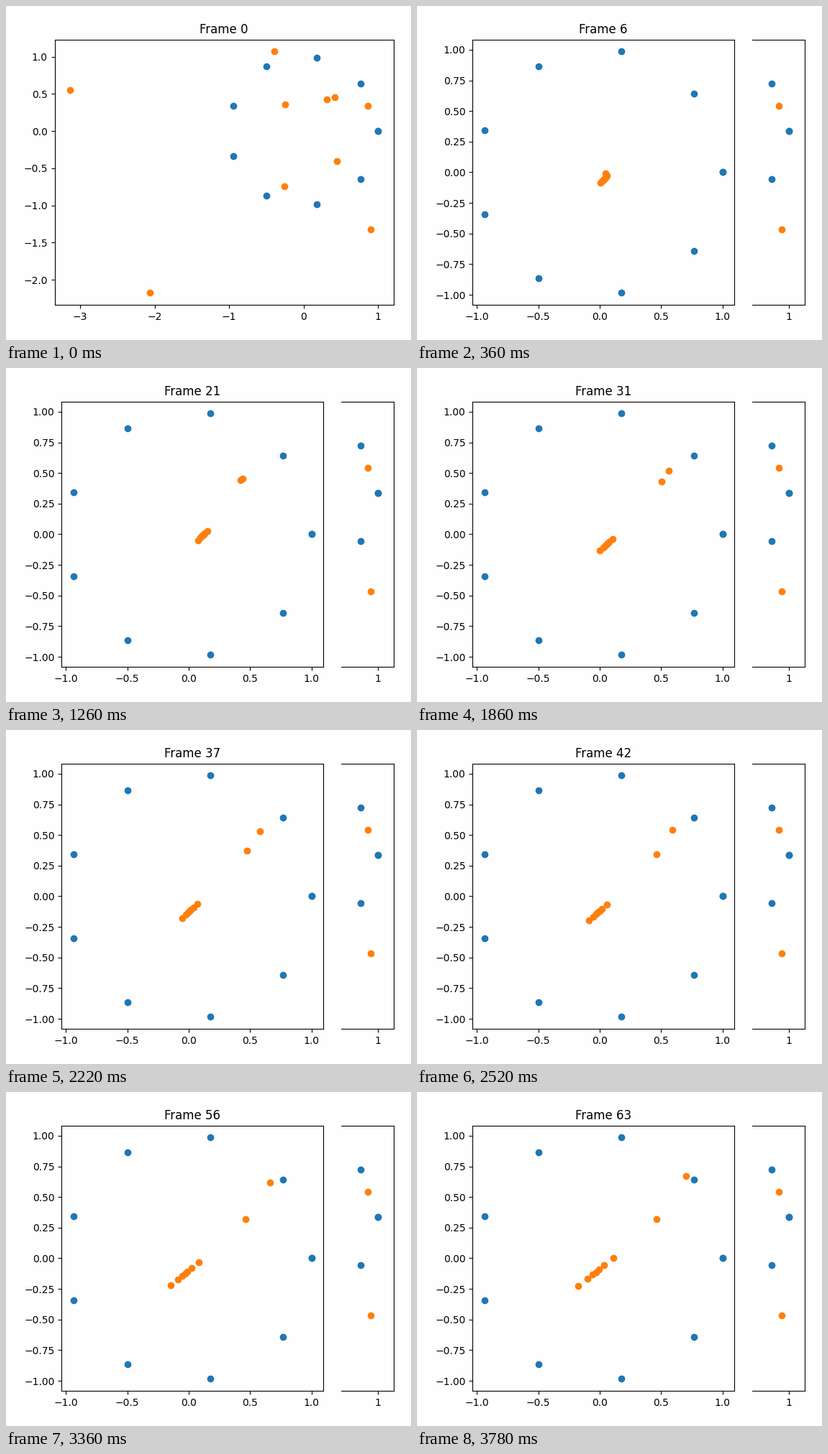
Write a matplotlib script that moves like this. It is 563 by 465 pixels and loops after 3840 ms.

```python
import numpy as np
import matplotlib.pyplot as plt
from matplotlib.animation import FuncAnimation
from matplotlib.patches import Rectangle

W, H, DPI = 563, 465, 100
FRAMES, INTERVAL = 64, 60
PAPER = "#fefefe"

# Plot boxes in pixels from the top left corner.
TOP, HEIGHT = 46.69, 369.6
WIDE_LEFT, WIDE_WIDTH = 67.6, 471
SQUARE_LEFT, SQUARE_WIDTH = 77.15, 364

angle = np.linspace(0, 2 * np.pi, 10)
circle = np.column_stack([np.cos(angle), np.sin(angle)])

noise = np.array([
    (-3.137, 0.552), (-0.39, 1.068), (0.31, 0.43), (0.42, 0.455),
    (-0.245, 0.358), (0.865, 0.34), (0.45, -0.405), (-0.255, -0.74),
    (0.903, -1.32), (-2.06, -2.178)])


def rise(t, centre, rate):
    return 1 / (1 + np.exp(-rate * (t - centre)))


def bump(t, centre, width):
    return np.exp(-((t - centre) / width) ** 2)


def leaders(t):
    """Two points that break away to the upper right and then part."""
    rise_x, rise_y = rise(t, 15.2, 0.2), rise(t, 12.9, 0.26)
    late = rise(t, 56, 0.17)
    return [
        (250 + 103.7 * rise_x + 26.5 * late, 252 - 110 * rise_y - 32 * late),
        (250 + 83 * rise_x + 15 * bump(t, 25, 9.5),
         252 - 75 * rise_y - 29 * bump(t, 22, 14)),
    ]


def group(t):
    """Seven points on a slanted line that drifts and stretches."""
    mid_x = 248.5 + 25 * bump(t, 20, 15)
    mid_y = 255.5 - 24 * bump(t, 17, 14.5) - 5 * bump(t, 66, 12)
    half = 3.3 * np.exp(0.0315 * t)
    slope = 1.1 - 0.0045 * t
    u = np.linspace(-1, 1, 7)
    spread = half * (u + u**3) / 2  # denser in the middle
    return np.column_stack([mid_x + spread, mid_y - slope * spread])


def predicted(t):
    """Point positions in data units of the square plot."""
    px = np.vstack([leaders(t), group(t)])
    low, high = circle.min(axis=0), circle.max(axis=0)
    centre = (SQUARE_LEFT + SQUARE_WIDTH / 2, TOP + HEIGHT / 2)
    scale = np.array([SQUARE_WIDTH, -HEIGHT]) / (1.1 * (high - low))
    return (low + high) / 2 + (px - centre) / scale


def make_axes(left, width, zorder):
    bottom = H - TOP - HEIGHT
    ax = fig.add_axes([left / W, bottom / H, width / W, HEIGHT / H],
                      zorder=zorder, facecolor=PAPER)
    ax.scatter(*circle.T)
    return ax


fig = plt.figure(figsize=(W / DPI, H / DPI), dpi=DPI, facecolor=PAPER)

wide = make_axes(WIDE_LEFT, WIDE_WIDTH, 0)
wide.scatter(*noise.T)
wide.set_title("Frame 0")

# The later, narrower plot leaves the right edge of the first one visible.
cover = Rectangle((0, 0), 466 / W, 1, transform=fig.transFigure,
                  facecolor=PAPER, linewidth=0, zorder=1)
fig.add_artist(cover)

square = make_axes(SQUARE_LEFT, SQUARE_WIDTH, 2)
dots = square.scatter(*predicted(1).T)
title = square.set_title("")


def update(n):
    cover.set_visible(n > 0)
    square.set_visible(n > 0)
    if n > 0:
        dots.set_offsets(predicted(n))
        title.set_text(f"Frame {n}")
    return cover, square


anim = FuncAnimation(fig, update, frames=FRAMES, interval=INTERVAL,
                     repeat=True, repeat_delay=0, blit=False)
plt.show()
```
